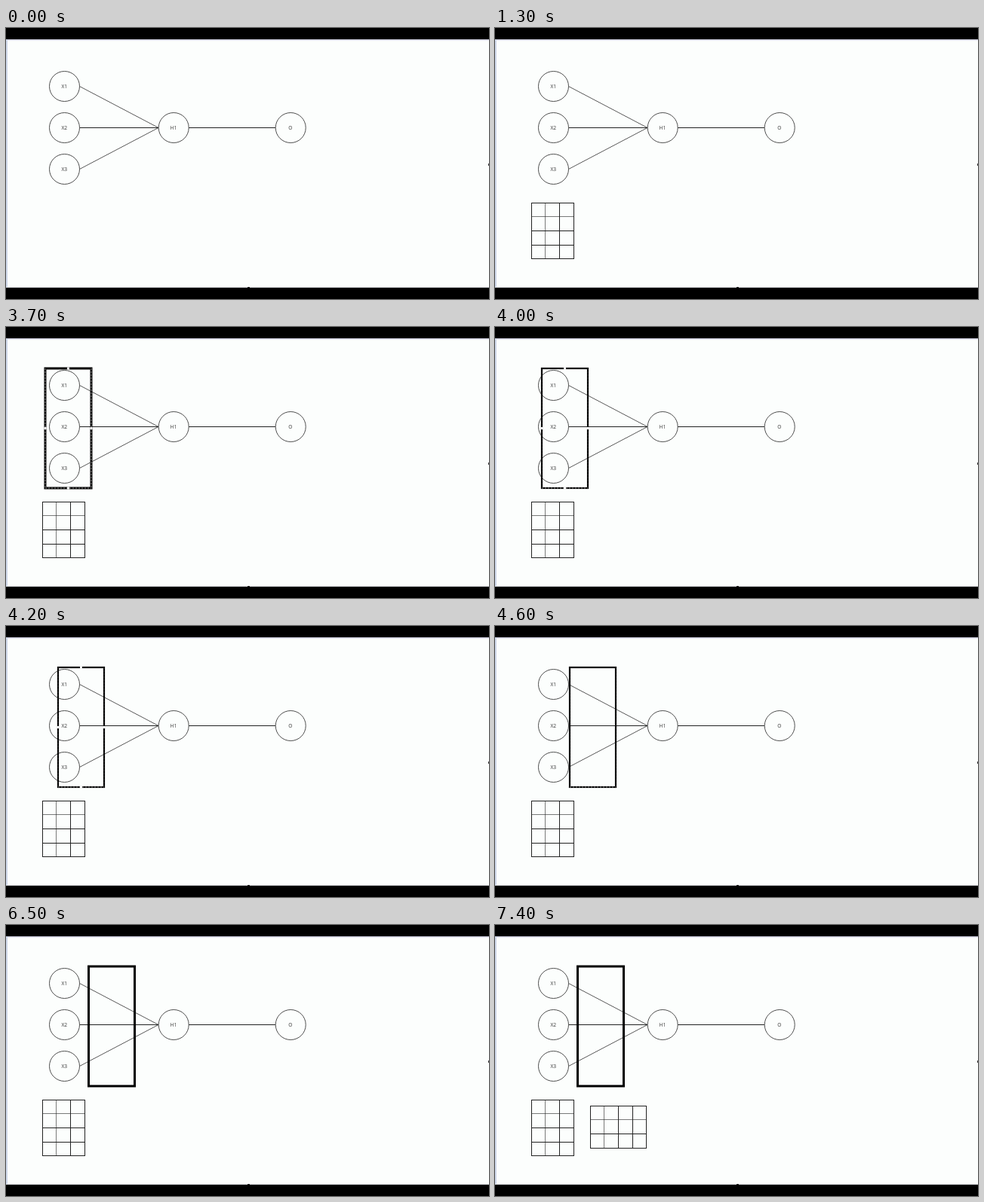
An HTML page that plays this animation: 640x360 px, repeating every 8000 ms.

```html
<!DOCTYPE html>
<html lang="en">
<head>
<meta charset="utf-8">
<title>Network diagram</title>
<style>
html, body { margin: 0; width: 100%; height: 100%; overflow: hidden; background: #000; }
svg { display: block; width: 640px; height: 360px; }
text { font: 6.6px "Open Sans", "Noto Sans", sans-serif; fill: #333; text-anchor: middle; }
.node { fill: #fcfefd; stroke: #222; stroke-width: .8; }
.link { stroke: #222; stroke-width: .75; }
.flat { stroke-width: 1; }
.grid { fill: none; stroke: #222; }
.frame { fill: none; stroke: #000; }
.dash { fill: none; stroke: #fff; stroke-width: 1; stroke-dasharray: 2 2; }
</style>
</head>
<body>
<svg id="stage" viewBox="0 0 640 360">
  <rect width="640" height="360"/>
  <rect y="15" width="640" height="330" fill="#fcfefd"/>
  <rect y="15" width="640" height="1.5" fill="#cfcfdf"/>
  <rect y="15" width="2" height="330" fill="#cdd6e8"/>
  <rect y="344" width="640" height="1" fill="#d5d7da"/>
  <rect x="639" y="180" width="1" height="3" fill="#333"/>
  <rect x="320" y="344" width="3" height="1" fill="#222"/>
</svg>
<script>
const LOOP = 8000, WIDTH = 61, TOP = 55, BOTTOM = 214, CELL = 18.7;
const stage = document.getElementById('stage');

function add(parent, tag, attrs, text) {
  const el = document.createElementNS('http://www.w3.org/2000/svg', tag);
  for (const key in attrs) el.setAttribute(key, attrs[key]);
  if (text) el.textContent = text;
  return parent.appendChild(el);
}

function link(x1, y1, x2, y2) {
  add(stage, 'line', { class: y1 === y2 ? 'link flat' : 'link', x1, y1, x2, y2 });
}

function node(cx, cy, label) {
  add(stage, 'circle', { class: 'node', cx, cy, r: 20 });
  add(stage, 'text', { x: cx - .3, y: cy + 2 }, label);
}

// The first inner line in each direction is fainter
function grid(x, y, cols, rows) {
  const g = add(stage, 'g', { class: 'grid' });
  const at = (from, i) => Math.floor(from + i * CELL) + .5;
  const line = (d, i) => add(g, 'path', { d, opacity: i === 1 ? .6 : 1 });
  const right = at(x, cols), bottom = at(y, rows);
  for (let i = 0; i <= cols; i++) line(`M${at(x, i)} ${y + .5}V${bottom}`, i);
  for (let i = 0; i <= rows; i++) line(`M${x} ${at(y, i)}H${right + .5}`, i);
  return g;
}

const inputs = [77.5, 132.5, 187.5];
inputs.forEach(y => link(97.5, y, 202, 132.5));
link(242, 132.5, 357, 132.5);
inputs.forEach((y, i) => node(77.5, y, 'X' + (i + 1)));
node(222.2, 132.5, 'H1');
node(377.2, 132.5, 'O');

const tall = grid(48, 232, 3, 4);
const wide = grid(126, 240, 4, 3);

// Selection box: solid frame, dashed overlay, mid-edge handles
const box = add(stage, 'g', {});
const frame = add(box, 'rect', { class: 'frame', y: TOP, width: WIDTH, height: BOTTOM - TOP });
const sides = add(box, 'path', { class: 'dash', d: `M0 ${TOP}V${BOTTOM}M${WIDTH} ${TOP}V${BOTTOM}` });
const base = add(box, 'path', { class: 'dash', d: `M0 ${BOTTOM}H${WIDTH}`, opacity: .5 });
const handles = add(box, 'g', { fill: '#fff' });
[[WIDTH / 2, TOP], [WIDTH / 2, BOTTOM], [0, 134.5], [WIDTH, 134.5]].forEach(([x, y]) =>
  add(handles, 'rect', { x: x - 1.5, y: y - 1.5, width: 3, height: 3 }));

// Nudged right in 100 ms steps, slowly and then faster
function boxLeft(t) {
  const n = Math.floor((t - 3700) / 100);
  if (n < 0) return 47;
  if (n >= 10) return 109.5;
  return Math.round(51.5 + 3.5 * n + 4 * Math.max(0, n - 5));
}

function show(el, on) {
  el.setAttribute('visibility', on ? 'inherit' : 'hidden');
}

function draw(t) {
  const selected = t < 6000;
  const moving = t >= 3800 && t < 4700;
  const fast = t >= 4400 && moving;
  show(tall, t >= 300);
  show(wide, t >= 7400);
  show(box, t >= 3000);
  show(base, selected);
  show(handles, selected && !fast);
  show(sides, selected);
  sides.setAttribute('opacity', moving ? .1 : .5);
  frame.setAttribute('stroke-width', moving ? 2.2 : 3);
  box.setAttribute('transform', `translate(${boxLeft(t)} 0)`);
}

const start = performance.now();
function tick() {
  draw((performance.now() - start) % LOOP);
  requestAnimationFrame(tick);
}
tick();
</script>
</body>
</html>
```
